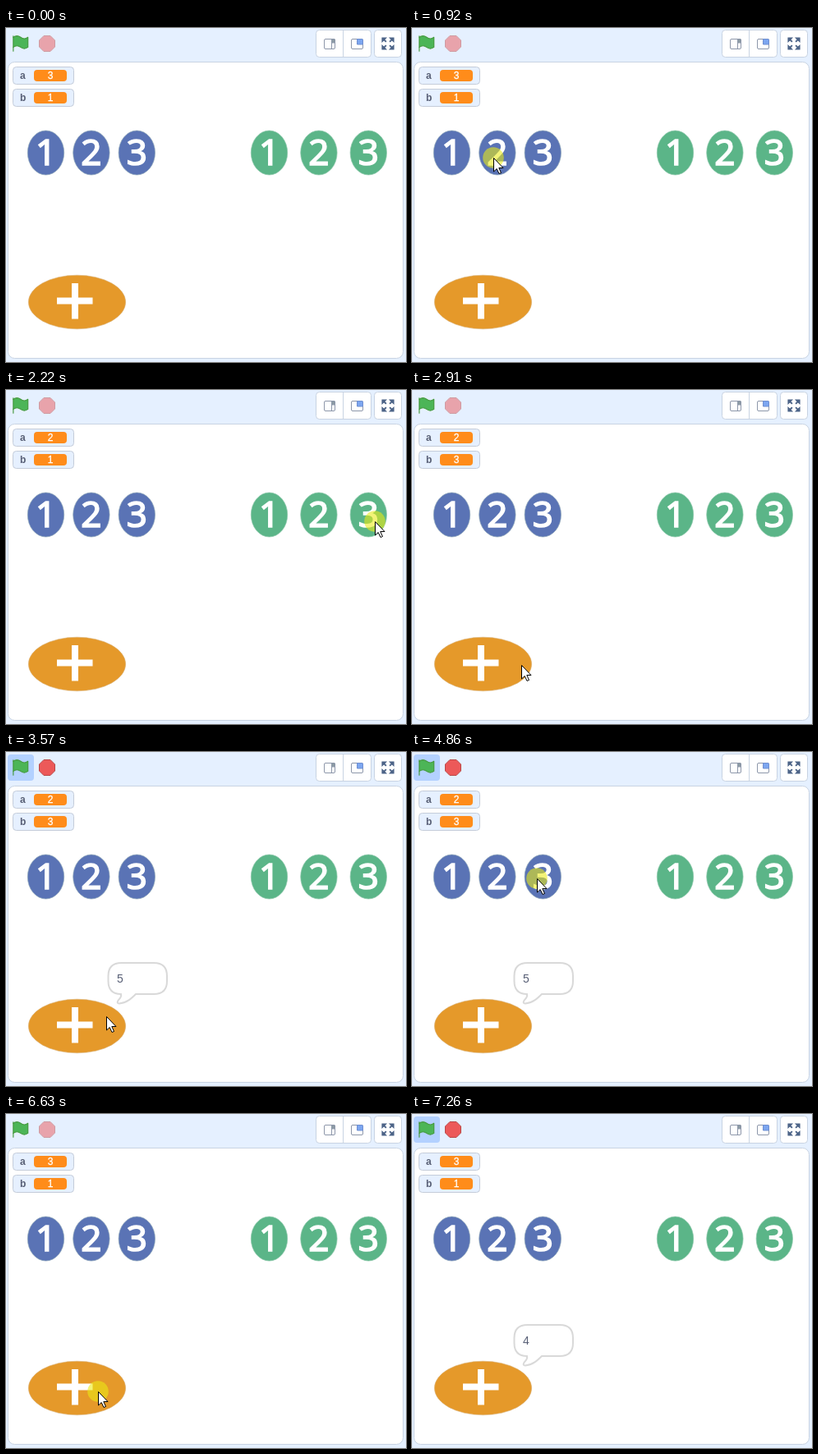
An HTML page that plays this animation: 487 by 407 pixels, repeating every 8.27 s.

```html
<!DOCTYPE html>
<html lang="en">
<head>
<meta charset="utf-8">
<title>Adding two numbers</title>
<style>
  html, body { margin: 0; width: 100%; height: 100%; overflow: hidden; background: #e5f0ff; }
  svg { display: block; }
  text { font-family: "Liberation Sans", Arial, sans-serif; font-size: 12px; }
  .panel { fill: #fff; stroke: #c8d3e2; }
  .digit { font: 44px "Noto Sans", "Open Sans", sans-serif; fill: #fff; stroke: #fff; stroke-width: 1.6; text-anchor: middle; }
  .label { font-weight: bold; fill: #575e75; }
  .value { fill: #fff; stroke: #fff; stroke-width: .3; text-anchor: middle; }
</style>
</head>
<body>
<svg width="487" height="407" viewBox="0 0 487 407">
  <rect class="panel" x="2.5" y="41.5" width="481" height="361" rx="8"/>

  <rect id="highlight" x="2" y="3" width="32" height="32" rx="4" fill="#b3d1ff"/>
  <g transform="translate(8 9) scale(1.16)" fill="#4cb557" stroke="#45993d" stroke-linecap="round" stroke-linejoin="round">
    <path d="M.75 2A6.44 6.44 0 0 1 8.44 2a6.44 6.44 0 0 0 7.69 0V12.4a6.44 6.44 0 0 1-7.69 0a6.44 6.44 0 0 0-7.69 0"/>
    <path d="M.75 16.5V.75"/>
  </g>
  <path id="stop" d="M46 9.5h8l5.5 5.5v8l-5.5 5.5h-8l-5.5-5.5v-8z" fill="#ec5959" stroke="#b84848" stroke-linejoin="round"/>

  <rect class="panel" x="377.5" y="2.5" width="67" height="33" rx="4"/>
  <path d="M410.5 3v32" stroke="#c8d3e2"/>
  <rect class="panel" x="448.5" y="2.5" width="33" height="33" rx="4"/>
  <g fill="#fff" stroke="#8d97aa">
    <rect x="387.5" y="13.5" width="13" height="12" rx="1.5"/>
    <path d="M396.5 13.5h3q1 0 1 1V18h-4z" fill="#8c9aa4"/>
    <path d="M396.5 14v11"/>
    <rect x="420.5" y="13.5" width="14" height="12" rx="1.5"/>
    <path d="M427.5 13.5h6q1 0 1 1V20h-7z" fill="#7ca6f0" stroke="#6f8fd0"/>
  </g>
  <g id="arrows" fill="#4d6488" stroke="#4d6488"></g>

  <g id="monitors"></g>
  <g id="buttons"></g>

  <ellipse cx="86.5" cy="334" rx="59.2" ry="32.8" fill="#e5992a" stroke="#d8b27a" stroke-width=".6"/>
  <path d="M62 332.5h43.5M84 311v43.5" stroke="#fff" stroke-width="8"/>

  <g id="bubble">
    <path d="M140 295Q124.5 295 124.5 279V273Q124.5 257 140.5 257H180Q196 257 196 273V279Q196 295 180 295H158C153 300 147 306 138 306.500C134 306.500 136 303 138 301C140 299 140.5 297 140 295Z" fill="#fff" stroke="#d9d9d9" stroke-width="2"/>
    <text id="answer" x="135" y="281" style="font-size:14px" fill="#575e75"></text>
  </g>

  <g id="pointer">
    <circle id="press" r="12.8" fill="#ebeb14" fill-opacity=".58"/>
    <path d="M.5 .5V17L4.200 13.5L7 19.500L9.500 18.500L6.800 12.500H12Z" fill="#fff" stroke="#000" stroke-linejoin="round"/>
  </g>
</svg>
<script>
const LOOP = 8270, STEP = 76;
const $ = id => document.getElementById(id);

$("arrows").innerHTML = [45, 135, 225, 315].map(angle =>
  `<g transform="translate(465 19) rotate(${angle})">
     <path d="M3 0H8" stroke-width="2"/><path d="M10 0L6.500 -3.500V3.500Z"/>
   </g>`).join("");

$("monitors").innerHTML = ["a", "b"].map((name, i) =>
  `<g transform="translate(0 ${27 * i})">
     <rect x="8.5" y="47.5" width="74" height="21" rx="4" fill="#e6f0ff" stroke="#c4ccd9"/>
     <text class="label" x="17" y="62">${name}</text>
     <rect x="34" y="51" width="40" height="14" rx="4" fill="#ff8c1a"/>
     <text class="value" id="${name}" x="54" y="62"></text>
   </g>`).join("");

const numberRow = (color, edge, left, gap) => [1, 2, 3].map((n, i) =>
  `<g transform="translate(${left + gap * i} 152)">
     <ellipse rx="22.2" ry="27" fill="${color}" stroke="${edge}" stroke-width=".7"/>
     <text class="digit" y="14.5">${n}</text>
   </g>`).join("");
$("buttons").innerHTML =
  numberRow("#5a73b5", "#8fa6b8", 48.5, 55.4) +
  numberRow("#5bb588", "#8cc8aa", 320.5, 60.4);

// Each move bends sideways by a share of its length
const entry = [373, 370];
const moves = [
  { start: 70, end: 840, to: [99, 158], bend: 0 },
  { start: 1080, end: 1990, to: [449, 160], bend: 0.48 },
  { start: 2320, end: 2910, to: [133, 335], bend: -0.45 },
  { start: 2990, end: 3140, to: [109, 327], bend: 0 },
  { start: 3460, end: 3570, to: [122, 322], bend: 0 },
  { start: 3570, end: 3920, to: [189, 351], bend: 0 },
  { start: 4320, end: 4690, to: [152, 154], bend: -0.43 },
  { start: 5010, end: 5700, to: [323, 157], bend: 0.1 },
  { start: 5930, end: 6480, to: [112, 338], bend: -0.6 },
  { start: 6740, end: 7260, to: [212, 400], bend: 0 }
];

// A click sets a variable, or shows the sum when it names none
const clicks = [
  { at: 920, name: "a", value: 2 },
  { at: 2160, name: "b", value: 3 },
  { at: 3310 },
  { at: 4860, name: "a", value: 3 },
  { at: 5780, name: "b", value: 1 },
  { at: 6580 }
];

function pointerAt(t) {
  let [x, y] = entry;
  for (const { start, end, to, bend } of moves) {
    if (t < start) break;
    const stepped = Math.floor((t - start) / STEP + 0.1) * STEP;
    const k = t >= end ? 1 : Math.min(1, stepped / (end - start));
    const s = 1 - (1 - k) ** 1.6;
    const dx = to[0] - x, dy = to[1] - y;
    const bulge = 2 * s * (1 - s) * bend;
    x += dx * s - dy * bulge;
    y += dy * s + dx * bulge;
  }
  return [Math.round(x), Math.round(y)];
}

function stateAt(t) {
  const state = { a: 3, b: 1, running: false, pressed: false, answer: null };
  for (const { at, name, value } of clicks) {
    const age = t - at;
    if (age < 0) break;
    if (age < 2 * STEP) state.pressed = true;
    if (age < STEP) continue;
    if (name) {
      state[name] = value;
      if (age < 3 * STEP) state.running = true;
    } else if (age < 2160) {
      state.running = true;
      if (age >= 2 * STEP) state.answer = state.a + state.b;
    }
  }
  // A spoken sum keeps its value while the variables change
  return state;
}

const show = (id, visible) => $(id).setAttribute("visibility", visible ? "inherit" : "hidden");

function draw(t) {
  const { a, b, running, pressed, answer } = stateAt(t);
  show("highlight", running);
  $("stop").setAttribute("opacity", running ? 1 : 0.5);
  $("a").textContent = a;
  $("b").textContent = b;
  show("bubble", answer !== null);
  $("answer").textContent = answer ?? "";
  show("press", pressed);
  show("pointer", t >= moves[0].start && t < moves.at(-1).end);
  $("pointer").setAttribute("transform", `translate(${pointerAt(t)})`);
}

const begin = performance.now();
function tick() {
  draw((performance.now() - begin) % LOOP);
  requestAnimationFrame(tick);
}
tick();
</script>
</body>
</html>
```
